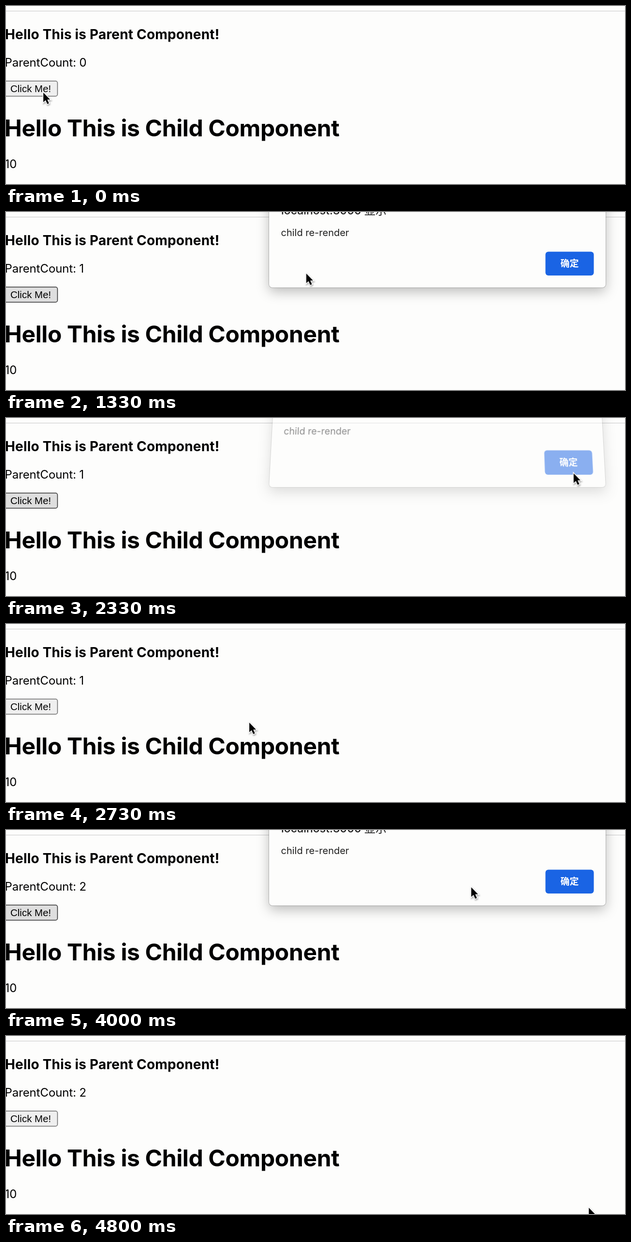
Write an HTML page that moves like this. It is 1280 px wide and 370 px high and loops after 4870 ms.

```html
<!DOCTYPE html>
<html lang="en">
<head>
<meta charset="utf-8">
<title>Child re-render</title>
<style>
@property --hide { syntax: "<number>"; inherits: false; initial-value: 1; }

html, body { margin: 0; width: 100%; height: 100%; overflow: hidden; background: #fdfdfc; }
.stage { position: relative; width: 1280px; height: 370px; overflow: hidden; }
svg { position: absolute; left: 0; top: 0; overflow: visible; }
text { font-family: Inter, "Noto Sans CJK SC", "Noto Sans CJK", sans-serif; font-optical-sizing: none; }

.h3 { font-size: 28px; font-weight: 700; letter-spacing: .18px; }
.h1 { font-size: 48px; font-weight: 700; letter-spacing: -.37px; }
.p { font-size: 24px; letter-spacing: -.08px; }
.label { font: 20.5px "Liberation Sans", Arial, sans-serif; }

.cursor, .dialog, .button, .count { animation: 4870ms linear infinite; }
.button { fill: #efefef; stroke: #6b6b6b; stroke-width: 1.5; animation-name: hover; animation-timing-function: step-end; }
.count { visibility: hidden; animation-timing-function: step-end; }
.zero { animation-name: zero; }
.one { animation-name: one; }
.two { animation-name: two; }
.cursor { animation-name: move; filter: drop-shadow(1px 2px 1.5px rgba(0, 0, 0, .35)); }

/* the sheet tips back around its lower edge while it fades */
.dialog {
  position: absolute; left: 543.5px; top: -60px; width: 696px; height: 217px; box-sizing: border-box;
  border-radius: 7px; background: #fdfdfc;
  box-shadow: 0 0 0 1px rgba(0, 0, 0, .2), 0 9px 26px rgba(0, 0, 0, .26);
  transform-origin: 50% 100%;
  opacity: calc(1 - var(--hide));
  transform: translateY(calc(-27px * var(--hide)))
    matrix3d(1, 0, 0, 0, 0, calc(1 + .083 * var(--hide)), 0, calc(-.00033 * var(--hide)), 0, 0, 1, 0, 0, 0, 0, 1);
  animation-name: sheet;
}
.dialog text { fill: #1f1f1f; }
.title { font-size: 23px; font-weight: 500; }
.message { font-size: 20px; }
.dialog .ok { font-size: 19px; font-weight: 700; fill: #fff; text-anchor: middle; }

@keyframes sheet {
  0%, 24% { --hide: 1; }
  27.2%, 46.16% { --hide: 0; }
  49.65%, 74.33% { --hide: 1; }
  77.82%, 89.65% { --hide: 0; }
  93.14%, 100% { --hide: 1; }
}
@keyframes hover {
  0%, 50.3%, 93.6%, 100% { fill: #efefef; stroke: #6b6b6b; }
  2.9%, 64.3% { fill: #dedede; stroke: #303030; }
}
@keyframes zero { 0% { visibility: visible; } 21.97%, 100% { visibility: hidden; } }
@keyframes one { 0%, 71.25%, 100% { visibility: hidden; } 21.97% { visibility: visible; } }
@keyframes two { 0% { visibility: hidden; } 71.25%, 100% { visibility: visible; } }
@keyframes move {
  0% { transform: translate(76px, 179px); }
  12% { transform: translate(74px, 179px); }
  20%, 22.5% { transform: translate(68px, 179px); }
  24% { transform: translate(130px, 172px); }
  27.31% { transform: translate(618px, 127px); }
  32.85% { transform: translate(1060px, 108px); }
  36.96%, 47.84% { transform: translate(1173px, 114px); }
  49.28% { transform: translate(1150px, 120px); }
  56.06% { transform: translate(503px, 204px); }
  63.04% { transform: translate(65px, 184px); }
  65.71%, 73.92% { transform: translate(40px, 179px); }
  78.03% { transform: translate(430px, 140px); }
  82.14% { transform: translate(960px, 118px); }
  86.24%, 90.8% { transform: translate(1165px, 124px); }
  94% { transform: translate(1180px, 200px); }
  98.56%, 100% { transform: translate(1204px, 356px); }
}
</style>
</head>
<body>
<div class="stage">
  <svg width="1280" height="370">
    <path d="M0 10.5H1280" stroke="#c6c6c8"/>
    <text class="h3" x="-2" y="69">Hello This is Parent Component!</text>
    <text class="p" x="-2.5" y="126">ParentCount:</text>
    <g class="p">
      <text class="count zero" x="151.5" y="126">0</text>
      <text class="count one" x="151.5" y="126">1</text>
      <text class="count two" x="151.5" y="126">2</text>
    </g>
    <rect class="button" x="-6" y="156" width="112.5" height="31.5" rx="4"/>
    <text class="label" x="9" y="179">Click Me!</text>
    <text class="h1" x="-3" y="271">Hello This is Child Component</text>
    <text class="p" x="-2.5" y="337">10</text>
  </svg>

  <div class="dialog">
    <svg width="696" height="217">
      <text class="title" x="25" y="65">localhost:3000 显示</text>
      <text class="message" x="24.5" y="110">child re-render</text>
      <rect x="571.5" y="142.5" width="100" height="49.5" rx="6" fill="#1a64e4"/>
      <text class="ok" x="621.5" y="174">确定</text>
    </svg>
  </div>

  <svg class="cursor" width="20" height="30">
    <path d="M1.2 1V21L5.8 16.8L9.4 24.8L12.9 23.2L9.4 15.4H15.3Z" stroke="#fff" stroke-width="3" paint-order="stroke"/>
  </svg>
</div>
</body>
</html>
```
